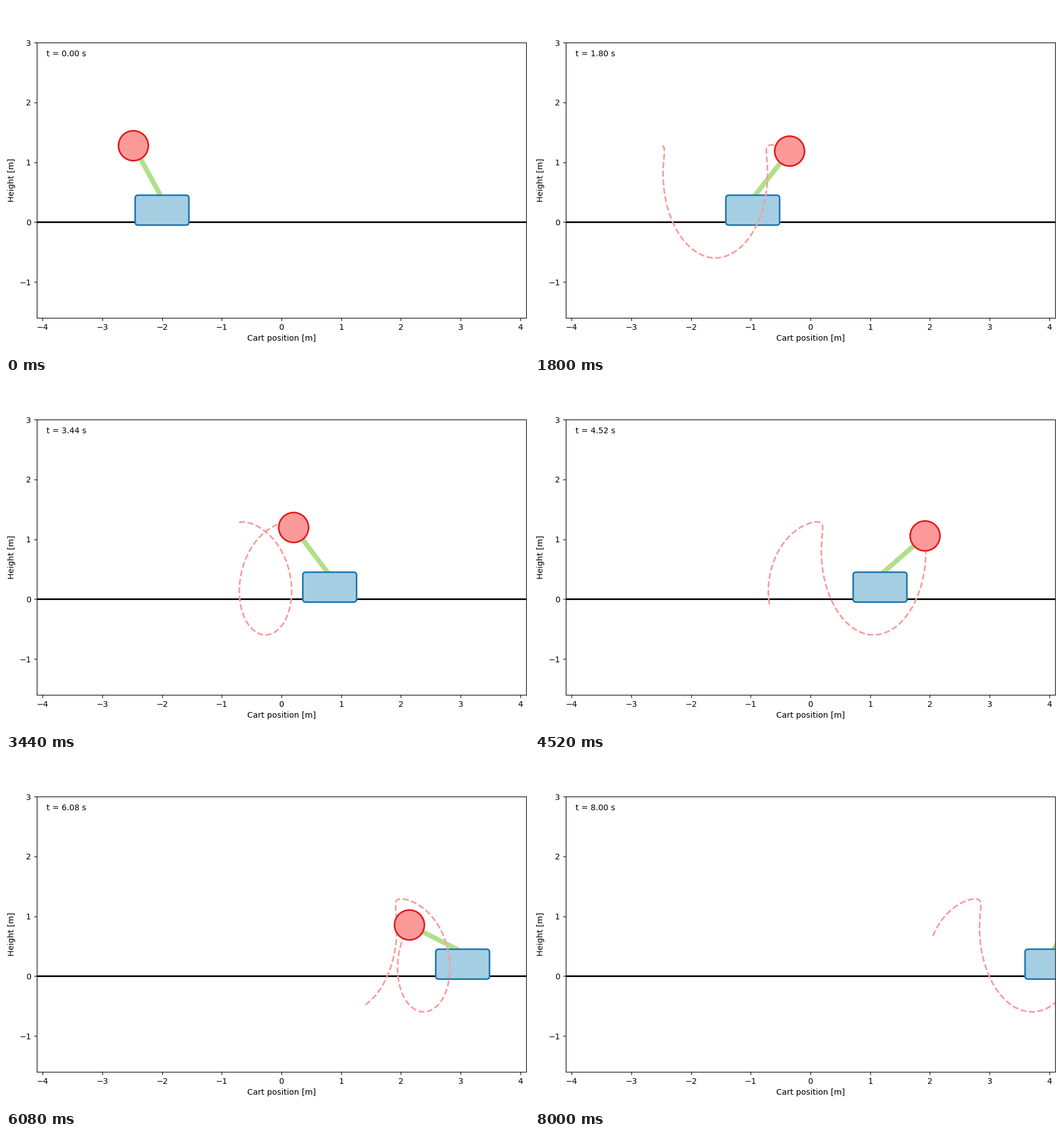
Animation of 917 by 611 pixels, one loop 8040 ms. Source, as a matplotlib script:

```python
import numpy as np
import matplotlib.pyplot as plt
from matplotlib.animation import FuncAnimation
from matplotlib.patches import Circle, FancyBboxPatch

W, H, DPI = 917, 611, 102
FRAMES, STEP = 201, 40
SKIP = 2  # simulation samples per drawn frame
DT, SUB = STEP / 1000 / SKIP, 10
SAMPLES = (FRAMES - 1) * SKIP + 1
TRAIL = 100

G, LENGTH = 9.81, 1.0
M_CART, M_BOB = 1.0, 0.6
MU = M_BOB / (M_CART + M_BOB)
X0, V0 = -2.0, 1.0
THETA0, OMEGA0 = 0.5, 0.6
CART_W, CART_H, PAD, RADIUS = 0.8, 0.4, 0.05, 0.25

BLUE, DARK_BLUE = "#a6cee3", "#1f78b4"
PINK, RED, GREEN = "#fb9a99", "#e31a1c", "#b2df8a"


def rate(s):
    """Pole angle from upright, on a frictionless cart."""
    th, om = s
    c, sn = np.cos(th), np.sin(th)
    acc = (G / LENGTH * sn - MU * sn * c * om**2) / (1 - MU * c**2)
    return np.array([om, acc])


def rk4(s, h):
    k1 = rate(s)
    k2 = rate(s + h / 2 * k1)
    k3 = rate(s + h / 2 * k2)
    k4 = rate(s + h * k3)
    return s + h / 6 * (k1 + 2 * k2 + 2 * k3 + k4)


def simulate():
    s = np.array([THETA0, OMEGA0])
    angles = [s[0]]
    for _ in range(SAMPLES - 1):
        for _ in range(SUB):
            s = rk4(s, DT / SUB)
        angles.append(s[0])
    return np.array(angles)


theta = simulate()
t = np.arange(SAMPLES) * DT
# The centre of mass drifts at constant speed.
drift = V0 - MU * LENGTH * np.cos(THETA0) * OMEGA0
cart_x = X0 + drift * t + MU * LENGTH * (np.sin(theta) - np.sin(THETA0))
bob_x = cart_x - LENGTH * np.sin(theta)
bob_y = CART_H + LENGTH * np.cos(theta)

fig = plt.figure(figsize=(W / DPI, H / DPI), dpi=DPI)
left, right, top, bottom = 53.7, 912.3, 64.2, 545.9
ax = fig.add_axes([left / W, 1 - bottom / H, (right - left) / W, (bottom - top) / H])
ax.set(xlim=(-4.1, 4.1), ylim=(-1.6, 3), xlabel="Cart position [m]", ylabel="Height [m]")
ax.set_yticks(range(-1, 4))

ax.axhline(0, color="black", lw=2, zorder=1)
rod, = ax.plot([], [], color=GREEN, lw=6, zorder=2)
cart = FancyBboxPatch((0, 0), CART_W, CART_H, boxstyle=f"round,pad={PAD}",
                      fc=BLUE, ec=DARK_BLUE, lw=2, zorder=3)
trail, = ax.plot([], [], "--", color=PINK, lw=2, zorder=4)
bob = Circle((0, 0), RADIUS, fc=PINK, ec=RED, lw=2, zorder=5)
ax.add_patch(cart)
ax.add_patch(bob)
clock = ax.text(0.02, 0.95, "", transform=ax.transAxes)


def update(i):
    k = i * SKIP
    rod.set_data([cart_x[k], bob_x[k]], [CART_H, bob_y[k]])
    cart.set_x(cart_x[k] - CART_W / 2)
    bob.center = bob_x[k], bob_y[k]
    past = slice(max(0, k + 1 - TRAIL), k + 1)
    trail.set_data(bob_x[past], bob_y[past])
    clock.set_text(f"t = {t[k]:.2f} s")
    return rod, cart, trail, bob, clock


anim = FuncAnimation(fig, update, frames=FRAMES, interval=STEP, repeat=True, repeat_delay=0)
plt.show()
```
